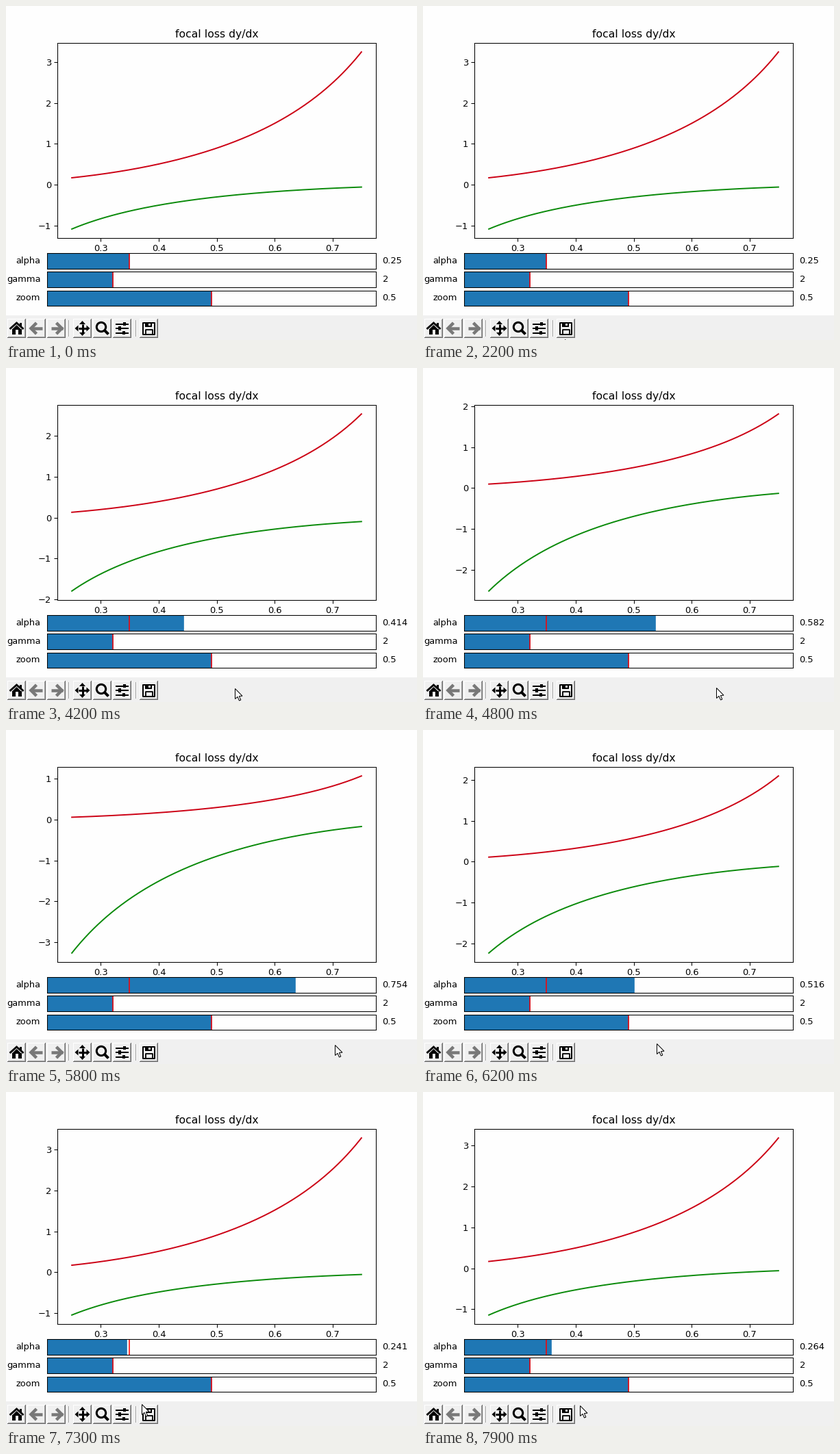
Animation, 600 px wide and 488 px high, one loop 8 s. Source, as a matplotlib script:

```python
import numpy as np
import matplotlib.pyplot as plt
from matplotlib.animation import FuncAnimation
from matplotlib.patches import Circle, Polygon, Rectangle
from matplotlib.ticker import MultipleLocator

W, H, DPI = 600, 488, 100
STEP_MS, FRAMES = 100, 80
PT = 72 / DPI         # points per pixel
ZOOM = 600 / 640      # the plot window is shown slightly reduced
CANVAS = 451.7        # height of the plot area above the toolbar
GAMMA = 2
PAPER, PANEL = "#fefefe", "#f0f0f0"

plt.rcParams["font.family"] = "DejaVu Sans"
for key in ("font.size", "axes.linewidth", "axes.titlepad", "lines.linewidth"):
    plt.rcParams[key] *= ZOOM
for axis in "xy":
    for key in ("size", "width", "pad"):
        plt.rcParams[f"{axis}tick.major.{key}"] *= ZOOM

fig = plt.figure(figsize=(W / DPI, H / DPI), dpi=DPI, facecolor=PAPER)


def canvas_axes(left, bottom, width, height):
    """Axes placed in fractions of the plot area."""
    k = CANVAS / H
    return fig.add_axes([left, 1 - k * (1 - bottom), width, k * height], facecolor=PAPER)


# Pointer glides: start, end and hiding time, then both end points
GLIDES = [
    (100, 300, 400, (409, 408), (154, 180)),
    (1000, 1300, 1500, (377, -8), (496, 120)),
    (2200, 2800, 3200, (207, 487), (180, 370)),
]
# Turning points of the drag: time, alpha, pointer x, pointer y
DRAG = np.array([
    (3100, .25, 180, 370),
    (3600, .246, 241, 468),
    (4800, .582, 428, 467),
    (5800, .754, 480, 460),
    (6700, .219, 168, 455),
    (7900, .264, 229, 458),
]).T


def drag_at(ms):
    return [np.interp(ms, DRAG[0], values) for values in DRAG[1:]]


def pointer_at(ms):
    for start, end, hide, origin, goal in GLIDES:
        if start <= ms < hide:
            t = min(1, (ms - start) / (end - start))
            return np.round(np.array(origin) * (1 - t) + np.array(goal) * t)
    return np.round(drag_at(ms)[1:]) if ms >= DRAG[0, 0] else None


# Plot of the loss gradients
def gradient(p):
    return GAMMA * (1 - p) ** (GAMMA - 1) * np.log(p) - (1 - p) ** GAMMA / p


p = np.linspace(.25, .75, 200)
positive, negative = gradient(p), -gradient(1 - p)

plot = canvas_axes(.125, .25, .775, .63)
plot.set_title("focal loss dy/dx")
plot.set_xlim(.225, .775)
plot.xaxis.set_major_locator(MultipleLocator(.1))
plot.yaxis.set_major_locator(MultipleLocator(1))
green_line, = plot.plot(p, positive, color="#0a8a0a")
red_line, = plot.plot(p, negative, color="#cc0014")


# Sliders
def make_slider(label, bottom, value, vmax):
    ax = canvas_axes(.1, bottom, .8, .05)
    ax.set(xlim=(0, vmax), ylim=(0, 1), xticks=[], yticks=[])
    bar = ax.add_patch(Rectangle((0, 0), value, 1, color="#1f77b4", lw=.5))
    ax.axvline(value, color="r", lw=1.1)
    ax.text(-.02, .5, label, transform=ax.transAxes, ha="right", va="center")
    text = ax.text(1.02, .5, f"{value:.3g}", transform=ax.transAxes, ha="left", va="center")
    return bar, text


alpha_bar, alpha_text = make_slider("alpha", .15, .25, 1)
make_slider("gamma", .09, 2, 10)
make_slider("zoom", .03, .5, 1)

# Overlay in stage pixels, y downwards
stage = fig.add_axes([0, 0, 1, 1], zorder=10)
stage.set(xlim=(0, W), ylim=(H, 0))
stage.axis("off")


def rect(x, y, w, h, color):
    stage.add_patch(Rectangle((x, y), w, h, fc=color, ec="none", zorder=2))


def block(x, y, half_w, half_h, color="k"):
    rect(x - half_w, y - half_h, 2 * half_w, 2 * half_h, color)


def frame(x, y, half_w, half_h, width):
    stage.add_patch(Rectangle((x - half_w, y - half_h), 2 * half_w, 2 * half_h, fill=False,
                              ec="k", lw=width * PT, joinstyle="round", zorder=3))


def stroke(points, width, color="k"):
    xs, ys = zip(*points)
    stage.plot(xs, ys, color=color, lw=width * PT, solid_capstyle="butt",
               solid_joinstyle="miter", zorder=3)


def home(x, y):
    stroke([(x - 10, y + 1), (x, y - 8), (x + 10, y + 1)], 2.8)
    stage.add_patch(Polygon([(x - 7, y + 2), (x, y - 5), (x + 7, y + 2)], fc="k", zorder=3))
    block(x + 6, y - 5, 1.5, 3)
    for side in (-1, 1):
        block(x + 4.5 * side, y + 5, 2.5, 4)


def arrow(side):
    def draw_arrow(x, y):
        stroke([(x + side * 9, y), (x - side * 8, y)], 4.5, "#787878")
        stroke([(x, y - 8), (x + side * 8, y), (x, y + 8)], 4.5, "#787878")
    return draw_arrow


def move(x, y):
    for dx, dy in ((1, 0), (-1, 0), (0, 1), (0, -1)):
        tip = np.array([x + 11 * dx, y + 11 * dy])
        back, across = 5 * np.array([dx, dy]), 4.5 * np.array([dy, dx])
        stroke([(x, y), tip - back], 3)
        stage.add_patch(Polygon([tip, tip - back + across, tip - back - across],
                                fc="k", ec="none", zorder=3))


def lens(x, y):
    stage.add_patch(Circle((x - 1.5, y - 2), 6.7, fill=False, ec="k", lw=3 * PT, zorder=3))
    stroke([(x + 3, y + 2.5), (x + 9, y + 8.5)], 4)


def tune(x, y):
    for dy, knob in ((-6.5, 3), (0, -4), (6.5, 2)):
        block(x, y + dy, 9.5, 1)
        block(x + knob, y + dy, 2, 2.7)


def save(x, y):
    frame(x, y, 8.5, 8.5, 2)
    frame(x, y + 5, 5, 3.5, 1.8)
    block(x - 1, y - 5, 5, 3)
    block(x + 1, y - 5.5, 1.2, 1.8, PANEL)


def button(icon, x, y=471):
    for grow, shift, color in ((0, 0, "#696969"), (-.5, -.5, "w"),
                               (-1, 0, "#a0a0a0"), (-1.5, -.5, PANEL)):
        block(x + shift, y + shift, 13.5 + grow, 14 + grow, color)
    icon(x, y)


rect(0, 451.5, W, H, PANEL)
# Groups of buttons start after a separator
for start, icons in ((15.5, (home, arrow(-1), arrow(1))), (111.5, (move, lens, tune)),
                     (208.5, (save,))):
    for n, icon in enumerate(icons):
        button(icon, start + 29 * n)
for x in (91, 189):
    rect(x, 459, 1, 24, "#a0a0a0")
    rect(x + 1, 459, 1, 24, "w")

ARROW = np.array([(.5, .5), (.5, 15.5), (4, 12.3), (6.5, 18), (8.8, 17), (6.4, 11.5), (11, 11.2)])
pointer = stage.add_patch(Polygon(ARROW, fc="w", ec="k", lw=PT, zorder=5))


def draw(i):
    ms = i * STEP_MS
    alpha = drag_at(ms)[0]
    green, red = alpha * positive, (1 - alpha) * negative
    green_line.set_ydata(green)
    red_line.set_ydata(red)
    low, high = green.min(), red.max()
    margin = .05 * (high - low)
    plot.set_ylim(low - margin, high + margin)
    alpha_bar.set_width(alpha)
    alpha_text.set_text(f"{alpha:.3g}")

    tip = pointer_at(ms)
    pointer.set_visible(tip is not None)
    if tip is not None:
        pointer.set_xy(ARROW + tip)


anim = FuncAnimation(fig, draw, frames=FRAMES, interval=STEP_MS, repeat=True, repeat_delay=0)
plt.show()
```
